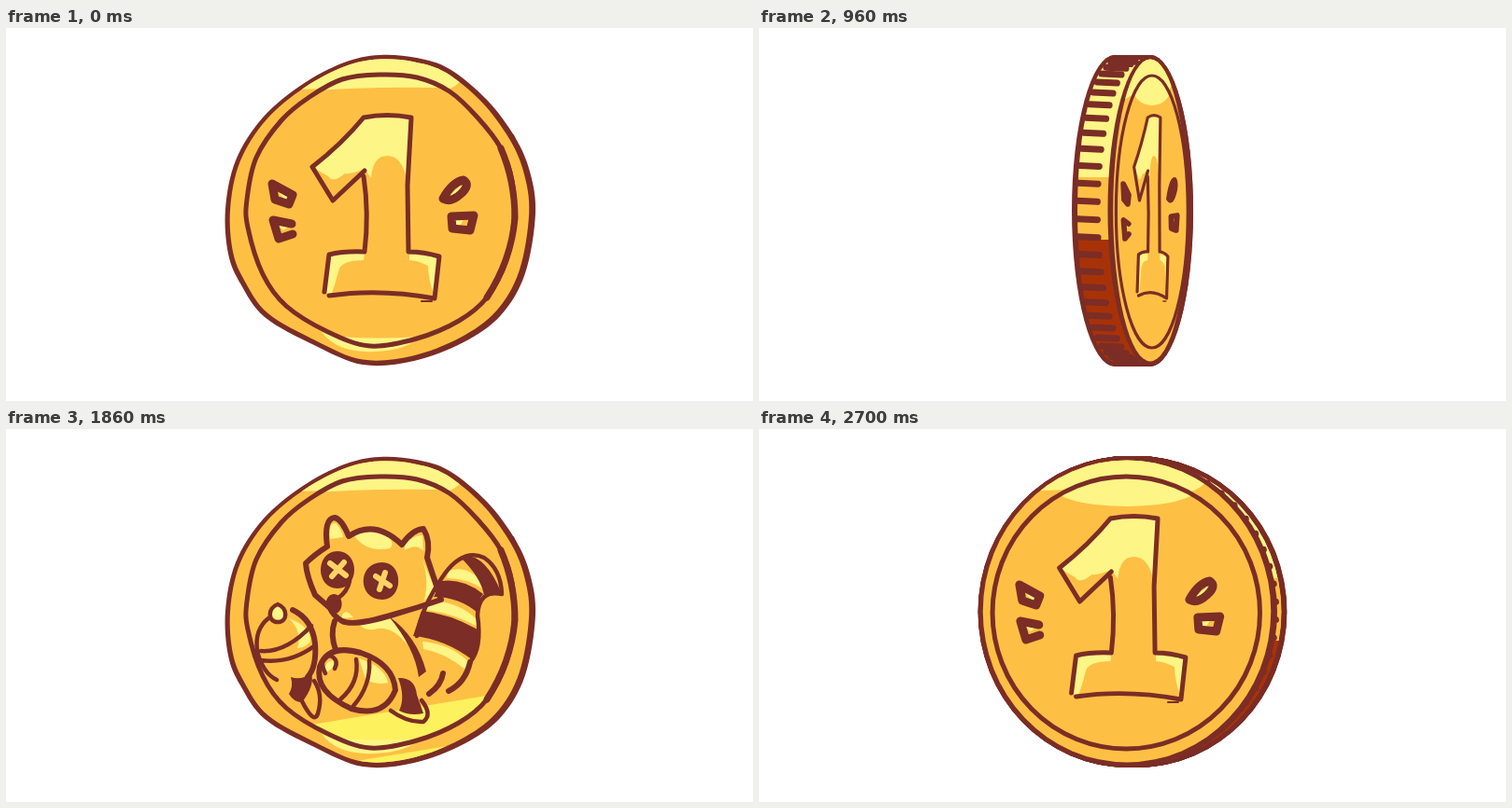
Write an HTML page with a canvas that moves like this. It is 800 px wide and 400 px high and loops after 2760 ms.

```html
<!DOCTYPE html>
<html lang="en">
<head>
<meta charset="utf-8">
<title>Spinning coin</title>
<style>
html, body { margin: 0; height: 100%; overflow: hidden; background: #fff; }
canvas { display: block; }
</style>
</head>
<body>
<canvas id="stage" width="800" height="400"></canvas>
<script>
const ctx = document.getElementById('stage').getContext('2d');
const GOLD = '#fdc044', PALE = '#fdf586', SHINE = '#fef15e', DARK = '#7b2d26', RUST = '#a83207';
const TICK = 60, HALF = 23, CX = 400, CY = 196, THICKNESS = 40;

// Smooth closed curve through a flat list of x, y values.
function closedCurve(flat) {
  const n = flat.length / 2, path = new Path2D();
  const at = i => { const k = (i + n) % n * 2; return [flat[k], flat[k + 1]]; };
  path.moveTo(...at(0));
  for (let i = 0; i < n; i++) {
    const [a, b, c, d] = [at(i - 1), at(i), at(i + 1), at(i + 2)];
    path.bezierCurveTo(b[0] + (c[0] - a[0]) / 6, b[1] + (c[1] - a[1]) / 6,
      c[0] - (d[0] - b[0]) / 6, c[1] - (d[1] - b[1]) / 6, c[0], c[1]);
  }
  return path;
}
function ellipse(x, y, rx, ry) {
  const path = new Path2D();
  path.ellipse(x, y, rx, ry, 0, 0, 2 * Math.PI);
  return path;
}

// The coin is wobbly at rest and round while it turns.
const still = {
  coin: closedCurve([400, 30, 362, 38, 318, 61, 275, 97, 246, 143, 235, 195, 238, 243, 251, 275,
    277, 311, 330, 341, 382, 362, 437, 358, 490, 338, 530, 309, 556, 264, 567, 200, 561, 155,
    545, 118, 515, 78, 475, 45, 440, 33]),
  ring: closedCurve([400, 51, 440, 54, 475, 69, 505, 97, 530, 130, 542, 165, 544, 205, 536, 250,
    515, 290, 485, 315, 440, 334, 390, 342, 345, 327, 300, 299, 275, 265, 259, 215, 258, 185,
    268, 140, 295, 100, 325, 75, 360, 56]),
  ringLight: new Path2D('M300 70Q400 62 500 66V30H300ZM358 332Q400 335 440 332L390 343Z'),
  foot: new Path2D('M338 327Q355 350 395 348Q425 347 442 334L390 343Z'),
  flicks: new Path2D('M240 246L250 270M543 116L553 140'),
  shade: new Path2D('M530 130Q545 165 545 205Q541 250 515 290')
};
const turning = {
  coin: ellipse(400, 197, 166, 167),
  ring: ellipse(400, 198, 144, 146),
  ringLight: ellipse(400, 65, 76, 19),
  foot: new Path2D(), flicks: new Path2D(), shade: new Path2D()
};

// Each side: raised gold shapes, pale highlights, dark fills, strokes by width, and gold strokes on top.
const numeral = {
  solid: `M383 97Q408 93 434 97L430 170L431 241Q448 241 464 246L459 291Q400 280 342 288L346 244
    Q362 240 384 241Q389 200 383 154L350 186L328 150Q360 125 383 97Z
    M285 168L308 180L303 191L287 185ZM285 207L308 211L305 221L292 227Z
    M468 185Q475 165 490 163Q500 170 485 182ZM477 202L502 201L497 219L477 217Z`,
  light: `M328 150Q360 125 383 97L434 97L429 163Q424 138 408 138Q393 138 391 162L384 152Q370 158 363 157
    Q350 168 345 160ZM346 244L384 242L383 250Q358 250 356 262Q353 275 348 288L342 284Z
    M432 243L464 247L459 290Q452 270 452 256Q440 250 432 250Z
    M292 178L305 181L301 187ZM291 212L305 212L297 218ZM474 181L488 169L486 177ZM480 207L490 206L486 214L480 213Z`,
  dark: '',
  strokes: [
    [5, `M328 150Q360 125 383 97Q408 92 434 97L430 170L431 241Q448 241 464 246L459 291Q400 280 346 288
      M341 284L346 244Q362 240 384 241Q389 200 383 160M384 154L350 186L328 150`],
    [2, 'M445 294H456'],
    [9, `M285 168L307 180L303 190L288 185ZM306 211L286 207L292 227L307 222
      M468 184Q478 166 490 164Q498 169 487 179Q476 189 468 184M477 203L501 202L497 218L478 216Z`]
  ],
  cross: ''
};

const raccoon = {
  solid: `M344 124Q340 96 352 95Q360 97 367 113Q395 97 424 122Q435 108 447 107Q455 120 451 138L466 183
    Q440 192 415 199Q440 225 445 262L355 238L352 206L331 178Q322 158 321 144Q330 135 344 124Z
    M281 203Q310 180 331 230Q333 262 310 268Q275 270 269 238Q266 215 281 203Z
    M336 255Q345 230 380 240Q415 252 417 280Q405 310 370 300Q330 282 336 255Z
    M440 222Q445 190 470 155Q490 128 512 138Q530 150 531 177Q506 172 505 200Q510 235 494 262L474 281Z`,
  light: `M372 113Q388 105 405 112Q418 122 411 128Q385 133 372 113Z
    M347 118Q345 100 353 101Q360 108 361 116ZM427 124Q437 113 446 114L447 131Q440 122 427 130Z
    M446 140L462 178Q448 180 447 186Q454 165 446 140ZM359 203Q362 190 372 202Z
    M378 209L410 202Q425 215 430 232Q415 212 398 214Q385 218 378 209Z
    M303 203Q327 212 326 228Q320 235 312 235Q318 218 303 203ZM284 198Q285 190 291 189Q299 192 299 200Q291 211 284 198Z
    M378 246Q406 255 409 272Q395 275 385 268ZM342 262Q340 248 352 248L350 256Z
    M474 152Q495 145 510 165L511 172Q495 160 472 160Z
    M455 184Q485 185 505 205L505 212Q480 198 450 194ZM446 228Q475 230 496 250L492 258Q470 240 447 236Z`,
  dark: `M355 131C379 131 379 171 355 171C331 171 331 131 355 131Z
    M403 143C426 143 426 183 403 183C376 183 376 143 403 143Z
    M351 177C363 177 362 199 351 198C340 196 340 178 351 177Z
    M486 137Q512 130 531 177Q520 172 512 178Q508 158 486 137Z
    M466 163Q490 160 511 177Q504 185 505 197Q485 180 458 180Z
    M445 195Q475 198 505 215Q506 235 500 248Q470 225 436 222Z
    M305 266Q316 270 327 262Q331 275 317 293Q308 293 303 284Q308 276 305 266Z
    M420 267Q438 266 440 285L447 305Q432 308 421 302Q428 288 420 267Z
    M410 201Q440 222 450 260L442 266Q438 235 410 201Z`,
  strokes: [
    [6, `M344 126Q340 96 352 95Q360 97 367 115Q395 96 424 124Q435 108 447 107Q455 120 451 138L466 183
      Q440 192 415 199Q372 212 360 206Q350 200 347 192L331 178Q322 158 321 144Q330 135 344 126
      M352 206Q347 220 353 237M336 255Q345 230 380 240Q415 252 417 280Q405 310 370 300Q330 282 336 255
      M307 194Q328 204 331 230Q333 255 323 266M468 262Q466 275 453 284M497 250Q492 272 474 281`],
    [4.5, `M281 203Q266 215 269 238Q275 262 290 269M273 238Q300 240 327 211M273 248Q305 252 331 232
      M291 188C280 192 280 207 291 207C302 207 302 192 291 188
      M375 247Q379 272 358 290M389 248Q391 275 372 297M342 262Q334 246 347 243Q357 247 352 257
      M316 290Q330 318 334 305Q340 285 330 270M412 302Q430 315 447 314Q457 306 445 291
      M368 163Q366 174 355 182M440 222Q445 190 470 155Q490 128 512 138Q530 150 531 177
      Q506 172 505 200Q510 235 497 250`]
  ],
  cross: 'M347 144L364 157M362 143L349 158M396 158L411 168M406 154L400 172'
};

for (const side of [numeral, raccoon]) {
  for (const key of ['solid', 'light', 'dark', 'cross']) side[key] = new Path2D(side[key]);
  side.strokes = side.strokes.map(([width, d]) => [width, new Path2D(d)]);
}

const edgePaint = ctx.createLinearGradient(0, 30, 0, 362);
[[0, PALE], [.39, PALE], [.39, GOLD], [.6, GOLD], [.6, RUST], [1, RUST]]
  .forEach(([stop, color]) => edgePaint.addColorStop(stop, color));

function place(x, y, sx, sy = 1) {
  ctx.setTransform(sx, 0, 0, sy, x - CX * sx, y - CY * sy);
}
function fill(path, color) {
  ctx.fillStyle = color;
  ctx.fill(path);
}
// Pen lines keep an even weight and thin only partly as the coin narrows.
function stroke(path, width, color = DARK) {
  const view = ctx.getTransform(), placed = new Path2D();
  placed.addPath(path, view);
  ctx.save();
  ctx.resetTransform();
  ctx.lineWidth = width * (1 + view.a) / 2;
  ctx.strokeStyle = color;
  ctx.stroke(placed);
  ctx.restore();
}
function within(path, draw) {
  ctx.save();
  ctx.clip(path);
  draw();
  ctx.restore();
}
function gleam(path, top) {
  within(path, () => {
    for (const [from, to] of [[0, 48], [66, 79]]) {
      const left = top + 10, right = top - 56;
      fill(new Path2D(`M200 ${left + from}L600 ${right + from}V${right + to}L200 ${left + to}Z`), SHINE);
    }
  });
}

function drawEdge(coin, back, front, y, squash, inner) {
  const span = front - back, dir = -Math.sign(span);
  for (const dark of [true, false]) {
    for (let i = 0; i <= THICKNESS; i++) {
      const x = back + span * i / THICKNESS;
      if (dark) place(x, y, squash);
      else place(x, y, inner, .97);
      fill(coin, dark ? DARK : edgePaint);
    }
  }
  ctx.resetTransform();
  for (let i = 0; i < 26; i++) {
    const a = ((i + .5) / 26 - .5) * Math.PI;
    const x = back + dir * (squash * 158 * Math.cos(a) - 4), ty = y + 160 * Math.sin(a);
    stroke(new Path2D(`M${x} ${ty}L${x + span * .55} ${ty + 1}`), 7);
  }
}

function drawFace(side, shape, x, y, squash, inner, lean, top) {
  const raised = top + 47;
  place(x, y, squash);
  fill(shape.coin, DARK);
  stroke(shape.flicks, 2);
  place(x - .8 * squash, y - .5, inner, .97);
  fill(shape.coin, GOLD);
  within(shape.coin, () => {
    place(x, y, squash);
    gleam(shape.coin, raised);
    fill(new Path2D(`M230 ${72 + 40 * Math.max(0, lean)}Q340 62 470 68Q482 65 489 55V20H230Z`), PALE);
    fill(shape.foot, PALE);
  });

  place(x + 3 * lean, y, squash * (1 - .06 * lean));
  fill(shape.ring, GOLD);
  gleam(shape.ring, top);
  within(shape.ring, () => fill(shape.ringLight, PALE));
  stroke(shape.ring, 5);
  stroke(shape.shade, 7);
  fill(side.solid, GOLD);
  gleam(side.solid, raised);
  fill(side.light, PALE);
  fill(side.dark, DARK);
  for (const [width, path] of side.strokes) stroke(path, width);
  stroke(side.cross, 6, '#fdd363');
}

// Turn angle in degrees: accelerates to 74, then runs evenly to 180.
function turn(phase) {
  if (phase < 600) return 0;
  return phase < 960 ? 33 * ((phase - 600) / 240) ** 2 : 74 + (phase - 960) * 106 / 420;
}

function render() {
  const tick = Math.floor(performance.now() / TICK) % (2 * HALF);
  const phase = tick % HALF * TICK, angle = turn(phase) * Math.PI / 180;
  const flipped = angle > Math.PI / 2;
  const side = (tick >= HALF) !== flipped ? raccoon : numeral;
  const shape = angle > 0 ? turning : still;
  const squash = Math.max(.04, Math.abs(Math.cos(angle))), inner = Math.max(.005, squash - .036);
  const shift = THICKNESS / 2 * Math.sin(angle) * (flipped ? -1 : 1);
  const y = tick === 0 || angle > 0 ? CY - 1 : CY;
  const top = 165 + 1.358 * (phase - 360);

  ctx.resetTransform();
  ctx.fillStyle = '#fff';
  ctx.fillRect(0, 0, 800, 400);
  ctx.lineCap = ctx.lineJoin = 'round';
  if (angle > 0) drawEdge(shape.coin, CX - shift, CX + shift, y, squash, inner);
  drawFace(side, shape, CX + shift, y, squash, inner, Math.sin(2 * angle), top);
  requestAnimationFrame(render);
}
render();
</script>
</body>
</html>
```
